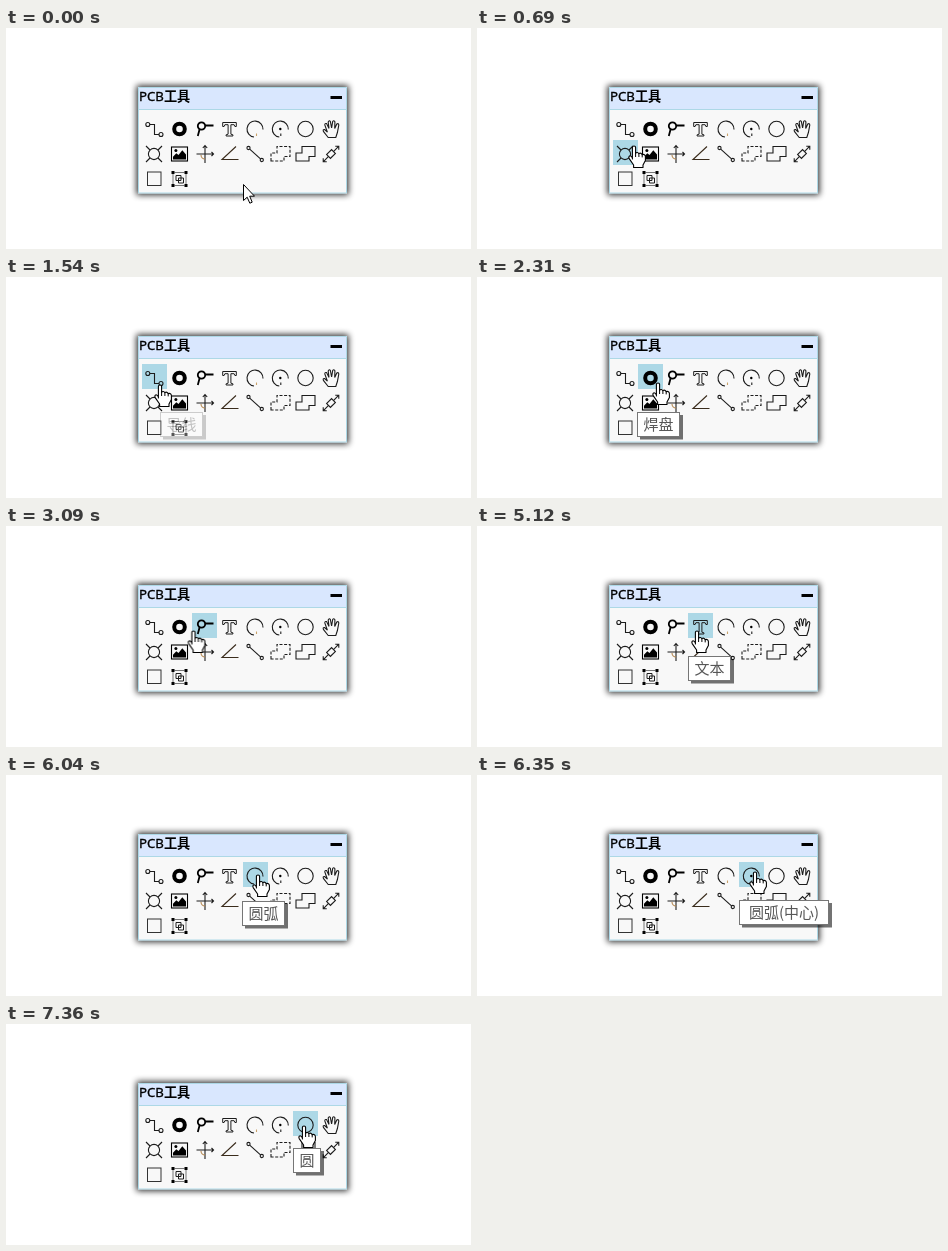
Write an HTML page that moves like this. It is 465 px wide and 221 px high and loops after 8 s.

```html
<!DOCTYPE html>
<html lang="zh-CN">
<head>
<meta charset="utf-8">
<title>PCB工具</title>
<style>
html, body { margin: 0; width: 100%; height: 100%; overflow: hidden; background: #fff; }
svg { display: block; width: 100vw; height: 100vh; }
text { font-family: "Noto Sans CJK SC", "Noto Sans CJK", sans-serif; }
.title { font: 13.2px "Noto Sans", "Noto Sans CJK SC", sans-serif; stroke: #000; stroke-width: .3; }
.title tspan { font-weight: 700; stroke: none; }
.icons { fill: none; stroke: #1c1c1c; stroke-width: 1.1; }
.icons .solid { fill: #000; stroke: none; }

.hover, .tip, .cursor, .arrow, .hand { animation: 8s step-end infinite; }
.hover { fill: #add8e6; animation-name: hover; }
.cursor { animation-name: move; }
.cursor path { stroke: #000; fill: #fff; stroke-linejoin: round; }
.arrow { animation-name: arrow; }
.hand { animation-name: hand; }

.face { fill: #fff; stroke: #767676; }
.shade { opacity: .55; filter: blur(.6px); }
.tip text { font-size: 15px; fill: #575757; text-anchor: middle; }

/* Cursor tip position; it advances in discrete ticks of about 78 ms */
@keyframes move {
  0% { transform: translate(237px, 156px); }
  2.75% { transform: translate(237px, 156px); animation-timing-function: steps(7, start); }
  9.555% { transform: translate(157px, 118px); animation-timing-function: steps(3, start); }
  12.47% { transform: translate(154px, 108px); }
  27% { transform: translate(154px, 108px); animation-timing-function: steps(3, start); }
  29.78% { transform: translate(181px, 106px); }
  38.62% { transform: translate(181px, 106px); animation-timing-function: steps(2, start); }
  40.87% { transform: translate(194px, 104px); }
  50.49% { transform: translate(194px, 104px); animation-timing-function: steps(1, start); }
  51.4% { transform: translate(195px, 104px); animation-timing-function: steps(5, start); }
  56.3% { transform: translate(219px, 105px); }
  63.99% { transform: translate(219px, 105px); animation-timing-function: steps(1, start); }
  65% { transform: translate(220px, 105px); animation-timing-function: steps(4, start); }
  68.83% { transform: translate(251px, 100px); }
  75.49% { transform: translate(251px, 100px); animation-timing-function: steps(1, start); }
  76.5% { transform: translate(252px, 100px); animation-timing-function: steps(4, start); }
  80.34% { transform: translate(278px, 97px); }
  89.12% { transform: translate(278px, 97px); animation-timing-function: steps(4, start); }
  92.9%, 100% { transform: translate(298px, 102px); }
}
@keyframes hover {
  0% { opacity: 0; transform: translate(186px, 112px); }
  5.667% { opacity: 1; transform: translate(186px, 112px); }
  6.64% { opacity: 1; transform: translate(161px, 112px); }
  8.58% { opacity: 1; transform: translate(136px, 112px); }
  10.53% { opacity: 1; transform: translate(136px, 87px); }
  27% { opacity: 1; transform: translate(161px, 87px); }
  38.62% { opacity: 1; transform: translate(186px, 87px); }
  54.34% { opacity: 1; transform: translate(211px, 87px); }
  66.91% { opacity: 1; transform: translate(237px, 87px); }
  77.46% { opacity: 1; transform: translate(262px, 87px); }
  90.07%, 100% { opacity: 1; transform: translate(287px, 87px); }
}
@keyframes arrow { 0% { opacity: 1; } 5.667%, 100% { opacity: 0; } }
@keyframes hand { 0% { opacity: 0; } 5.667%, 100% { opacity: 1; } }

@keyframes track {
  0% { opacity: 0; }
  18.37% { opacity: 0; animation-timing-function: steps(3, start); }
  21.18% { opacity: 1; }
  27%, 100% { opacity: 0; }
}
@keyframes pad { 0% { opacity: 0; } 27.93% { opacity: 1; } 38.62%, 100% { opacity: 0; } }
@keyframes via { 0% { opacity: 0; } 39.74% { opacity: 1; } 54.34%, 100% { opacity: 0; } }
@keyframes label { 0% { opacity: 0; } 55.32% { opacity: 1; } 66.91%, 100% { opacity: 0; } }
@keyframes arc { 0% { opacity: 0; } 67.87% { opacity: 1; } 77.46%, 100% { opacity: 0; } }
@keyframes center { 0% { opacity: 0; } 78.42% { opacity: 1; } 90.07%, 100% { opacity: 0; } }
@keyframes circle { 0% { opacity: 0; } 91.02%, 100% { opacity: 1; } }
</style>
</head>
<body>
<svg viewBox="0 0 465 221">
  <defs>
    <g id="box">
      <rect class="shade" x="3" y="3" width="43" height="24.5"/>
      <rect class="face" x=".5" y=".5" width="42" height="24"/>
    </g>
    <path id="step" d="M-9.5 7V-1H-3.5V-7.5H9.5V2.5H3.5V7Z"/>
  </defs>

  <!-- Panel -->
  <rect x="130.5" y="57.5" width="212" height="109.5" opacity=".82" style="filter: blur(3.4px)"/>
  <rect x="132" y="59" width="209" height="106.5" fill="#f8f8f8"/>
  <rect x="132" y="59" width="209" height="23" fill="#d9e7fe"/>
  <path d="M132.5 59.5H340.5V165H132.5ZM132 81.5H341" fill="none" stroke="#add8e6"/>
  <text class="title" x="133" y="73">PCB<tspan>工具</tspan></text>
  <rect x="324.5" y="68" width="11.5" height="3"/>

  <rect class="hover" width="25" height="25"/>

  <g class="icons">
    <!-- Row 1 -->
    <g transform="translate(148 101)">
      <circle cx="-6.2" cy="-4.5" r="2"/>
      <path d="M-4.2-4.5H.5V5.5H5"/>
      <circle cx="7" cy="5.5" r="2"/>
    </g>
    <circle cx="173.5" cy="101" r="5.3" stroke="#000" stroke-width="4"/>
    <g transform="translate(199 101)" stroke="#000" stroke-width="1.8">
      <circle cx="-3.5" cy="-3" r="3.7"/>
      <path d="M.2-3.5H8.5M-5.4.2L-7.2 7"/>
    </g>
    <path transform="translate(223.5 101)" d="M-6.8-6.5H6.8V-2.5H5.4L4.6-4.3H1.4V5.2L3.4 5.8V7H-3.4V5.8L-1.4 5.2V-4.3H-4.6L-5.4-2.5H-6.8Z" stroke-width="1"/>
    <g transform="translate(249 101)">
      <path d="M-1 8A8 8 0 1 1 8 .5"/>
      <path d="M1.5 4.5V7" stroke="#caa26a"/>
    </g>
    <g transform="translate(274.3 101)">
      <path d="M-1 8A8 8 0 1 1 8 .5M.5 4.5V7"/>
      <circle class="solid" r="1.2"/>
    </g>
    <circle cx="299.5" cy="101" r="7.7"/>
    <path transform="translate(325 101)" d="M-2.8 8.5L-7.6 2.4Q-8.4.3-6.4.6L-3.6 3.2L-6.2-4Q-6.2-6-4.4-5.4L-2-.6L-2.8-7Q-1.7-9.2-.6-7.4L.6-1L1.7-7.6Q3-9 3.9-7.2L3.7-.6L5.8-5Q7.5-6 7.8-4L6.4 3.5L4.8 8.5Z"/>

    <!-- Row 2 -->
    <g transform="translate(148 126)">
      <circle r="5.6"/>
      <path d="M-8-8L-4-4M8-8L4-4M-8 8L-4 4M8 8L4 4"/>
    </g>
    <g transform="translate(173.5 125.5)">
      <rect x="-8" y="-6.5" width="16" height="14" stroke="#000"/>
      <path class="solid" d="M-6.5 6V3.2L-3.2-.3L-1 1.5L2.8-3.2L6.5 1V6Z"/>
      <circle class="solid" cx="-3.6" cy="-3" r="1.5"/>
    </g>
    <g transform="translate(199 126)">
      <path d="M-8.5 0H8.5M0 9V-8M-2.2-6L0-8.5L2.2-6M6.5-2L8.5 0L6.5 2"/>
      <path d="M-4 1A4 4 0 0 0 0 5" stroke="#b48750"/>
    </g>
    <path d="M230 118.5L216 131.5H232.5" stroke="#3a2c1c"/>
    <g transform="translate(249 126)">
      <circle cx="-6.5" cy="-6" r="1.6"/>
      <path d="M-5.3-4.8L5.5 4.8"/>
      <circle cx="6.8" cy="6" r="1.6"/>
    </g>
    <use href="#step" x="274.5" y="126" stroke-dasharray="3 1.6"/>
    <use href="#step" x="299.5" y="126"/>
    <g transform="translate(325 126) rotate(-45)">
      <path d="M-11 0H-3.5M3.5 0H11M-8.5-2.5L-11 0L-8.5 2.5M8.5-2.5L11 0L8.5 2.5"/>
      <rect x="-3.5" y="-2.7" width="7" height="5.4"/>
    </g>

    <!-- Row 3 -->
    <rect x="141.5" y="144" width="13.5" height="13.5" stroke="#333" stroke-width="1"/>
    <g transform="translate(173.5 151)" stroke-width="1">
      <path d="M-5-6.5H5M-5 6.5H5M-6.5-5V5M6.5-5V5" stroke="#777"/>
      <path class="solid" d="M-8-8h3v3h-3zM5-8h3v3h-3zM-8 5h3v3h-3zM5 5h3v3h-3z"/>
      <path d="M-3.5-3.5H1.5V1.5H-3.5ZM-1-1H4V4H-1Z"/>
    </g>
  </g>

  <!-- Tooltips -->
  <g class="tip" transform="translate(154 135)" style="animation-name: track">
    <use href="#box"/>
    <text x="21.5" y="17.5">导线</text>
  </g>
  <g class="tip" transform="translate(160 135)" style="animation-name: pad">
    <use href="#box"/>
    <text x="21.5" y="17.5">焊盘</text>
  </g>
  <g class="tip" transform="translate(186 130)" style="animation-name: via">
    <use href="#box"/>
    <text x="21.5" y="17.5">过孔</text>
  </g>
  <g class="tip" transform="translate(211 130)" style="animation-name: label">
    <use href="#box"/>
    <text x="21.5" y="17.5">文本</text>
  </g>
  <g class="tip" transform="translate(236 126)" style="animation-name: arc">
    <use href="#box"/>
    <text x="21.5" y="17.5">圆弧</text>
  </g>
  <g class="tip" transform="translate(262 125)" style="animation-name: center">
    <rect class="shade" x="3" y="3" width="90" height="24.5"/>
    <rect class="face" x=".5" y=".5" width="89" height="24"/>
    <text x="45" y="17.5">圆弧(中心)</text>
  </g>
  <g class="tip" transform="translate(287 124)" style="animation-name: circle">
    <rect class="shade" x="3" y="3" width="28" height="24.5"/>
    <rect class="face" x=".5" y=".5" width="27" height="24"/>
    <text x="14" y="17.5">圆</text>
  </g>

  <g class="cursor">
    <path class="arrow" d="M.5 .5V16.5L4.2 13.2L6.8 19.2L9.2 18.2L6.7 12.2H11.5Z"/>
    <g class="hand">
      <path d="M-1.6 13V1.6A1.6 1.6 0 0 1 1.6 1.6V7.2Q3.4 5.6 4.9 7.6Q6.8 6.4 8.2 8.6Q11 7.8 11.4 10.5V14.5L9 19V21.5H-.4V19L-4.8 12.6Q-5.8 10.4-3.8 9.8Q-2.6 9.8-1.6 12Z" stroke-width="1.1"/>
      <path d="M1.6 7V11M4.9 7.6V11M8.2 8.6V11.4"/>
    </g>
  </g>
</svg>
</body>
</html>
```
